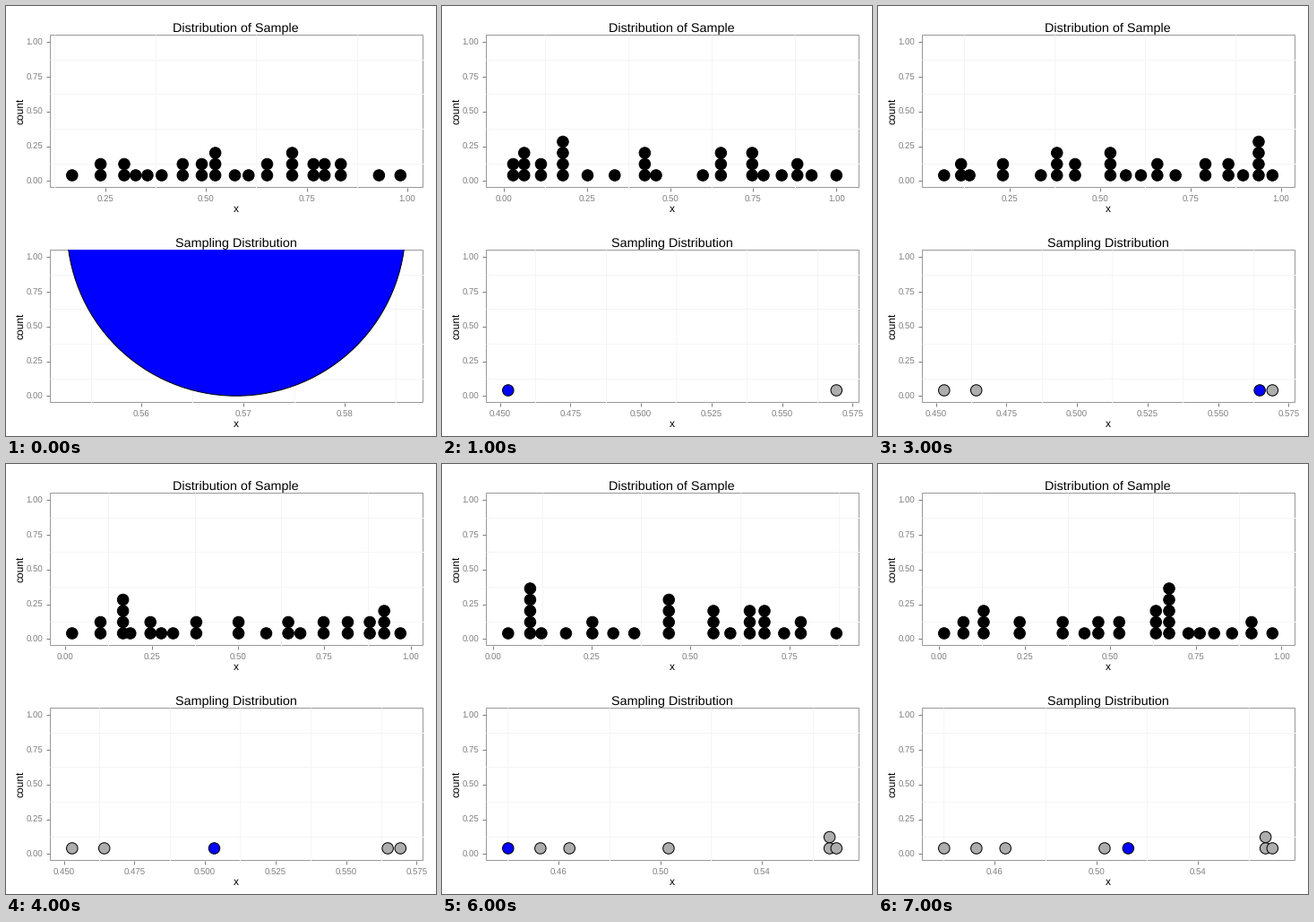
Write a matplotlib script that moves like this. It is 480 px wide and 480 px high and loops after 8 s.

```python
import numpy as np
import matplotlib.pyplot as plt
from matplotlib.animation import FuncAnimation
from matplotlib.patches import Circle, Rectangle

plt.rcParams["font.family"] = "Liberation Sans"
plt.rcParams["text.hinting"] = "none"

SIZE = 480
LEFT, RIGHT = 49, 465          # panel edges in pixels
TOP, HEIGHT = 32, 170.5
CENTRE = (LEFT + RIGHT) / 2
FIRST, SPAN = 73.8, 366.5      # first dot and distance to the last one
DOT = 12.5                     # dot diameter
COUNT = 30                     # values per sample
GREY = "#7f7f7f"
GRID = "#f5f5f5"

# mean, smallest and largest value of each sample
SAMPLES = [(0.5693, 0.168, 0.983), (0.4529, 0.013, 1.000),
           (0.4643, 0.020, 0.980), (0.5648, 0.069, 0.976),
           (0.5033, 0.020, 0.970), (0.5684, 0.014, 0.986),
           (0.4402, 0.039, 0.869), (0.5126, 0.014, 0.974)]
MEANS = np.array([s[0] for s in SAMPLES])


def sample(step):
    """Seeded random values with the given mean and range."""
    mean, low, high = SAMPLES[step]
    t = np.sort(np.random.default_rng(40 + step).uniform(0, 1, COUNT))
    t[0], t[-1] = 0, 1
    goal = (mean - low) / (high - low)
    power = 1.0
    for _ in range(30):
        power *= np.mean(t ** power) / goal
    return low + (high - low) * t ** power


def fit(values):
    """Zero position and scale that spread the values over the panel."""
    scale = SPAN / (max(values) - min(values))
    return FIRST - min(values) * scale, scale


def stack(xs):
    """Group positions closer than one dot into (centre, count) columns."""
    groups = []
    for x in sorted(xs):
        if groups and x - groups[-1][0] < SPAN / COUNT:
            groups[-1].append(x)
        else:
            groups.append([x])
    return [((g[0] + g[-1]) / 2, len(g)) for g in groups]


fig = plt.figure(figsize=(SIZE / 72, SIZE / 72), dpi=72, facecolor="white")
ax = fig.add_axes([0, 0, 1, 1])


def line(xs, ys, color):
    ax.plot(xs, ys, color=color, lw=1, zorder=1, solid_capstyle="butt")


def label(x, y, text, size, color="black", ha="center", angle=0):
    ax.text(x, y, text, fontsize=size, color=color, ha=ha, va="baseline",
            rotation=angle, rotation_mode="anchor")


def panel(top, title, zero, scale, gap, digits, origin=0):
    """Frame, grid, ticks and labels; returns the clip box and the y of 0."""
    bottom = top + HEIGHT
    unit = HEIGHT / 1.1
    base = bottom + 0.5 - 0.05 * unit
    box = Rectangle((LEFT, top), RIGHT - LEFT, HEIGHT - 0.5, fill=False,
                    ec="#999999", lw=1, zorder=0)
    ax.add_patch(box)

    for i in range(5):
        y = base - i / 4 * unit
        line([LEFT - 4.3, LEFT], [y, y], GREY)
        label(41.5, y + 3.5, f"{i / 4:.2f}", 9.6, GREY, "right")
        if i < 4:
            mid = y - unit / 8
            line([LEFT, RIGHT + 1], [mid, mid], GRID)

    first = int((LEFT - zero) / scale / gap) - 2
    for i in range(first, first + 10):
        value = origin + i * gap
        x = zero + value * scale
        if LEFT < x < RIGHT:
            line([x, x], [bottom, bottom + 4.5], GREY)
            label(x, bottom + 16, f"{value:.{digits}f}", 9.6, GREY)
        mid = x + gap * scale / 2
        if LEFT < mid < RIGHT:
            line([mid, mid], [top, bottom + 0.5], GRID)

    label(CENTRE - 0.3, top - 3.3, title, 14.4)
    label(CENTRE - 0.3, bottom + 27.5, "x", 12)
    label(19.3, top + HEIGHT / 2, "count", 12, angle=90)
    return box, base


def dots(columns, panel_box, color, z=2, size=DOT):
    box, base = panel_box
    for x, count in columns:
        for k in range(count):
            dot = Circle((x, base - (k + 0.5) * size), size / 2, fc=color,
                         ec="black", lw=1, zorder=z)
            ax.add_patch(dot)
            dot.set_clip_path(box)


def draw(step):
    ax.clear()
    ax.set(xlim=(0, SIZE), ylim=(SIZE, 0))
    ax.axis("off")

    values = sample(step)
    zero, scale = fit(values)
    upper = panel(TOP, "Distribution of Sample", zero, scale, 0.25, 2)
    dots(stack(zero + values * scale), upper, "black")

    means = MEANS[:step + 1]
    size = DOT
    if step == 0:              # a lone value fills the whole panel
        scale = 11350
        zero = CENTRE - means[0] * scale
        size = (RIGHT - LEFT) / 1.1
        ticks = 0.01, 2
    else:
        zero, scale = fit(means)
        ticks = (0.025, 3) if np.ptp(means) < 0.12 else (0.04, 2, 0.02)
    lower = panel(TOP + 240, "Sampling Distribution", zero, scale, *ticks)
    xs = zero + means * scale
    dots(stack(xs[:-1]), lower, "#adadad")
    dots([(xs[-1], 1)], lower, "blue", 3, size)
    return []


anim = FuncAnimation(fig, draw, frames=len(SAMPLES), interval=1000,
                     repeat=True, repeat_delay=0, init_func=lambda: draw(0))
plt.show()
```
